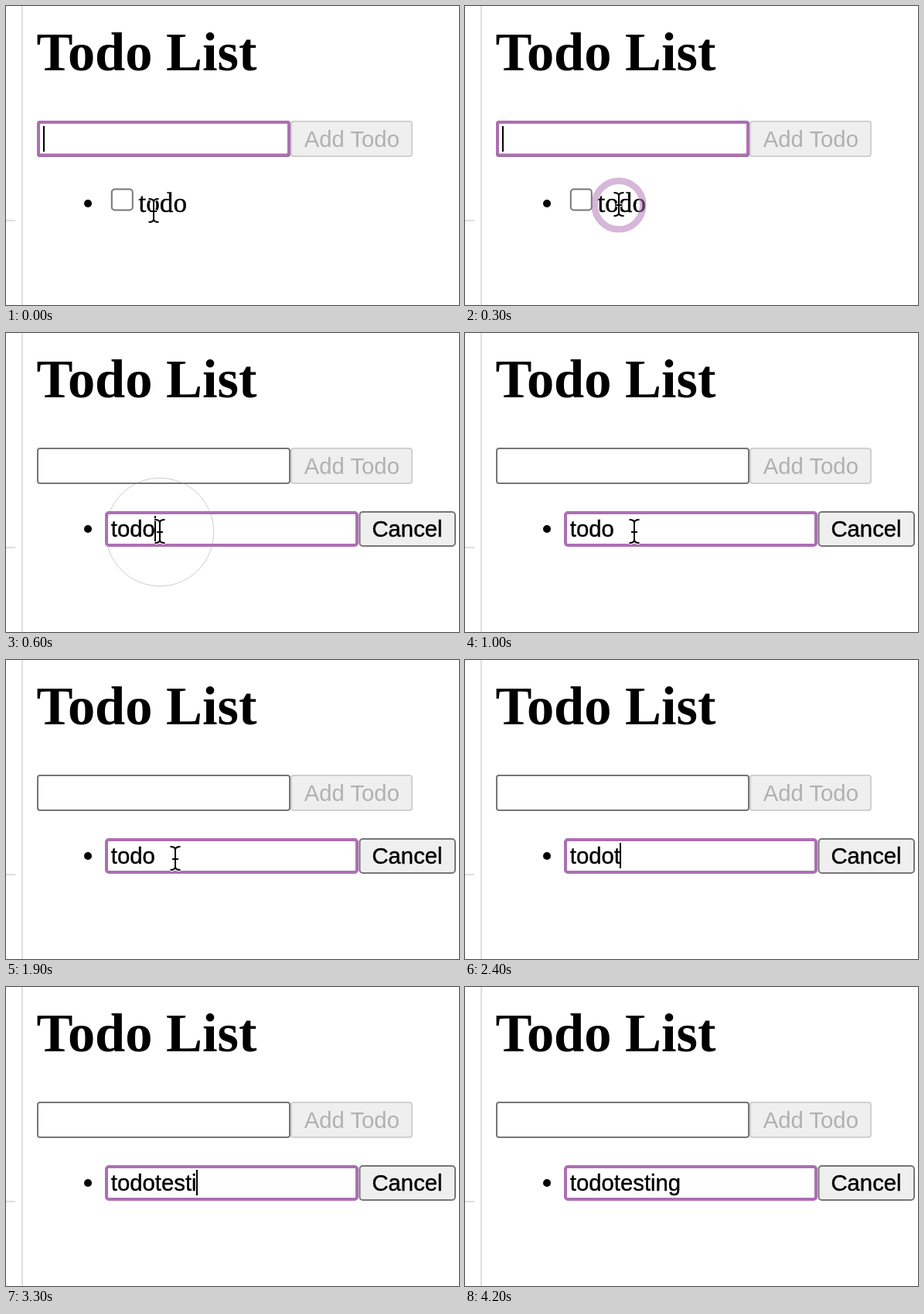
An HTML page for the animation above (4700 ms loop, 586 by 386 pixels).

```html
<!DOCTYPE html>
<html lang="en">
<head>
<meta charset="utf-8">
<title>Todo List</title>
<style>
  html, body { margin: 0; width: 100%; height: 100%; overflow: hidden; background: #fff; }
  svg { display: block; width: 586px; height: 386px; }
  text { white-space: pre; }
  .serif { font-family: "Liberation Serif", Times, serif; font-size: 35.2px; }
  .sans { font-family: "Liberation Sans", Arial, sans-serif; font-size: 29.3px; }
  .title { font-size: 70.4px; font-weight: bold; }
  .dark { stroke: #000; stroke-width: .4; }
  .rule { stroke: #dedede; stroke-width: 2; }
  .box { fill: #fff; stroke: #767676; stroke-width: 2; }
  .button { fill: #efefef; }
  .off { stroke: #d0d0d0; }
  .focus { stroke: #ad6fb3; stroke-width: 4; }
  .faded { fill: #b1b1b1; }
  #ring { fill: none; stroke: #ad6fb3; stroke-opacity: .5; }
  .halo { stroke: #fff; stroke-width: 4; }
  .beam { stroke: #000; stroke-width: 2; }
  #cursor { fill: none; }
</style>
</head>
<body>
<svg viewBox="0 0 586 386">
  <defs>
    <path id="ibeam" d="M-6.5-15Q0-15 0-11Q0-15 6.5-15M0-11V11M-6.5 15Q0 15 0 11Q0 15 6.5 15M-4 1H4"/>
  </defs>
  <path class="rule" d="M21 0V386M0 277H12"/>
  <text class="serif title" x="39.4" y="83">Todo List</text>

  <rect class="box" x="41" y="149" width="326" height="45" rx="3"/>
  <rect class="box button off" x="369" y="149" width="156" height="45" rx="3"/>
  <text class="sans faded" x="447.3" y="182" text-anchor="middle">Add Todo</text>
  <circle id="bullet" cx="106" r="5"/>

  <g id="view">
    <rect class="box focus" x="42" y="150" width="324" height="42.5" rx="3"/>
    <rect class="box" x="136.8" y="236.5" width="27" height="27" rx="4"/>
    <text class="serif dark" x="171.5" y="265.5">todo</text>
  </g>

  <g id="edit">
    <rect class="box focus" x="130" y="232" width="324" height="42" rx="3"/>
    <rect class="box button" x="457.5" y="231" width="123.5" height="44" rx="4"/>
    <text class="sans dark" x="519" y="262.5" text-anchor="middle">Cancel</text>
    <text id="value" class="sans dark" x="135.8" y="262.5"></text>
  </g>

  <rect id="caret" width="2" height="33"/>
  <circle id="ring" cx="199" cy="257"/>
  <g id="cursor">
    <use href="#ibeam" class="halo"/>
    <use href="#ibeam" class="beam"/>
  </g>
</svg>
<script>
  const LOOP = 4700, STEP = 100, EDIT = 400, BLINK = 500;
  const keyTimes = [2400, 2700, 2900, 3100, 3300, 3500, 3700];
  const path = [[0, 191, 264], [200, 199, 256], [600, 199, 256], [1000, 219, 256]];

  const $ = id => document.getElementById(id);
  const show = (el, on) => el.setAttribute("visibility", on ? "visible" : "hidden");
  const set = (el, attrs) => {
    for (const k in attrs) el.setAttribute(k, attrs[k]);
  };
  const [view, edit, value, caret, ring, cursor, bullet] =
    ["view", "edit", "value", "caret", "ring", "cursor", "bullet"].map($);

  function pointerAt(t) {
    const i = path.findIndex(p => p[0] > t);
    if (i < 0) return path[path.length - 1].slice(1);
    const [t0, x0, y0] = path[i - 1], [t1, x1, y1] = path[i];
    const k = (t - t0) / (t1 - t0);
    return [x0 + (x1 - x0) * k, y0 + (y1 - y0) * k];
  }

  function draw(t) {
    const editing = t >= EDIT;
    const typed = keyTimes.filter(k => k <= t).length;
    show(view, !editing);
    show(edit, editing);
    bullet.setAttribute("cy", editing ? 253 : 255);

    // Each key press restarts the caret blink.
    value.textContent = "todo" + "testing".slice(0, typed);
    const since = t - (typed ? keyTimes[typed - 1] : EDIT);
    show(caret, !editing || Math.floor(since / BLINK) % 2 === 0);
    set(caret, editing
      ? { x: Math.round(135.8 + value.getComputedTextLength()) - 1, y: 236 }
      : { x: 48, y: 155 });

    // The click ring widens while its line thins out.
    show(ring, t >= 200 && t < 700);
    const age = Math.max(0, t - 200);
    set(ring, { r: 18.5 + age / 7.8, "stroke-width": Math.max(1, 11 - age / 40) });
    ring.style.stroke = t >= 600 ? "#999" : "";

    show(cursor, !typed);
    cursor.setAttribute("transform", `translate(${pointerAt(t)})`);
  }

  const start = performance.now();
  let last = -1;
  function tick() {
    const t = Math.floor((performance.now() - start) % LOOP / STEP) * STEP;
    if (t !== last) draw(last = t);
    requestAnimationFrame(tick);
  }
  tick();
</script>
</body>
</html>
```
